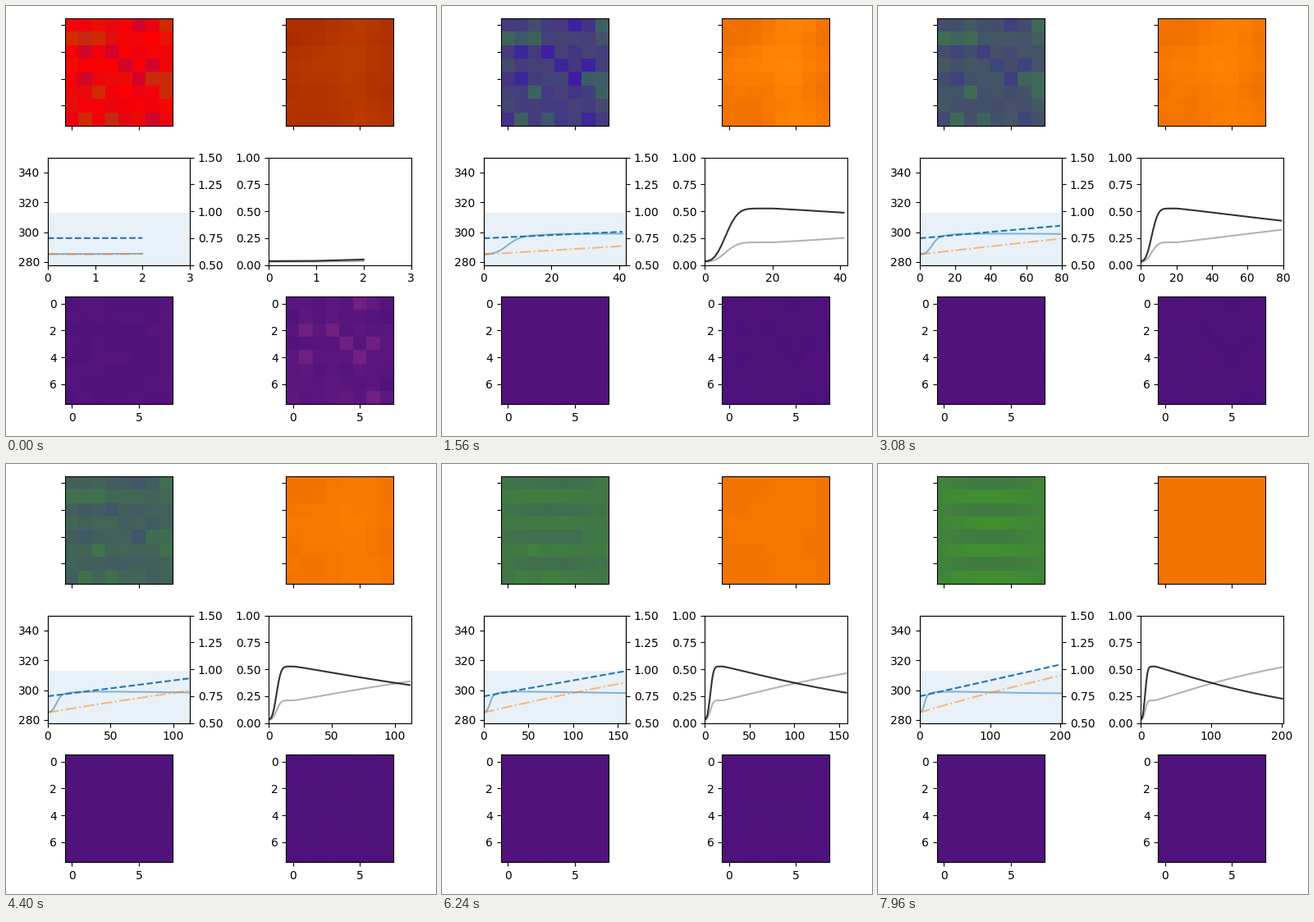
These frames come from a looping animation (524x524 px, 8 s). A matplotlib script:

```python
import numpy as np
import matplotlib.pyplot as plt
from matplotlib.animation import FuncAnimation

SIZE, DPI, N, FRAMES = 524, 100, 8, 200
t = np.arange(FRAMES + 2)
prev = np.maximum(t - 1, 0)

# ---- planet averages: quick colonisation, then white replaces black ----
rise = 1 - np.exp(-(t / 7.2) ** 2.7)
black = (.036 + .49 * rise) * np.exp(-(np.maximum(t - 20, 0) / 211) ** 1.11)
white = .066 + .67 * rise + .00005 * t - black
light = .75 + .00148 * prev


def albedo(w, b):
    return .5 + .25 * (w - b)


def warmth(lum, alb):
    return (1000 * lum * (1 - alb) / 5.67e-8) ** .25


# temperature is taken before each growth step
temp = warmth(light, albedo(white, black)[prev])
bare_temp = warmth(light, .5)

# ---- local differences around the averages ----
rng = np.random.default_rng(4)


def colony(*cells):
    """Zero-mean field with colonies at cells given as row * 10 + column."""
    f = .15 * rng.normal(size=(N, N))
    for c in cells:
        f[divmod(c, 10)] = 1
    return f - f.mean()


def column(values):
    return values[:, None, None]


white_amp = column(.15 * np.exp(-(t / 110) ** 2))
black_amp = column(.17 * np.exp(-(t / 90) ** 2) * (1 - .6 * np.exp(-t / 2.5)))
dw = white_amp * colony(7, 10, 11, 12, 46, 47, 52, 57, 71, 73)
db = black_amp * colony(5, 21, 23, 34, 36, 41, 45, 76)

row, col = np.mgrid[:N, :N]
bands = np.where(row % 2, 1, -1) * np.sin(np.pi * (col + .5) / N)
drift = column(.04 * np.clip((t - 60) / 140, 0, 1)) * bands

share = column((white + black) / .74)
W = np.clip(column(white) + dw - .8 * share * db + drift, .004, 1)
B = np.clip(column(black) + db - .8 * share * dw - drift, .004, 1)
mix = np.stack([np.clip(1 - W - B, 0, 1), W, B], axis=-1)

# heat spreads between neighbours, wrapping at the edges
spread = albedo(W, B)[prev]
for axis in (1, 2, 1, 2):
    spread = (np.roll(spread, 1, axis) + 2 * spread + np.roll(spread, -1, axis)) / 4
heat = warmth(column(light), spread)

# ---- layout, in pixels from the top left ----
LEFT, RIGHT, WIDE, TALL = 50.75, 320.25, 173.3, 130.9
TOP, MIDDLE, BOTTOM = 15, 184.7, 354.4
fig = plt.figure(figsize=(SIZE / DPI, SIZE / DPI), dpi=DPI)


def place(x, y, w):
    return fig.add_axes([x / SIZE, 1 - (y + TALL) / SIZE, w / SIZE, TALL / SIZE])


def panel(x, y, data, **style):
    ax = place(x + (WIDE - TALL) / 2, y, TALL)
    im = ax.imshow(data, aspect="auto", **style)
    ax.set_xticks([0, 5])
    ax.set_yticks([0, 2, 4, 6])
    if y == TOP:
        ax.tick_params(labelbottom=False, labelleft=False)
    return im


change = dict(cmap="magma", vmin=-.1, vmax=.3)
im_mix = panel(LEFT, TOP, mix[2])
im_heat = panel(RIGHT, TOP, heat[2], cmap="afmhot", vmin=250, vmax=350)
im_dw = panel(LEFT, BOTTOM, W[2] - W[1], **change)
im_db = panel(RIGHT, BOTTOM, B[2] - B[1], **change)

ax_temp = place(LEFT, MIDDLE, WIDE)
ax_temp.set_ylim(278, 350)
ax_temp.axhspan(278, 313, color="tab:blue", alpha=.1, lw=0)
ax_light = ax_temp.twinx()
ax_light.set_ylim(.5, 1.5)
ax_cover = place(RIGHT, MIDDLE, WIDE)
ax_cover.set_ylim(0, 1)

curves = [
    (ax_temp.plot([], [], color="tab:blue", alpha=.5)[0], temp),
    (ax_temp.plot([], [], "-.", color="tab:orange", alpha=.5)[0], bare_temp),
    (ax_light.plot([], [], "--", color="tab:blue")[0], light),
    (ax_cover.plot([], [], color="black", alpha=.3)[0], white),
    (ax_cover.plot([], [], color="black", alpha=.8)[0], black),
]


def update(k):
    now = k + 2
    im_mix.set_data(mix[now])
    im_heat.set_data(heat[now])
    im_dw.set_data(W[now] - W[now - 1])
    im_db.set_data(B[now] - B[now - 1])
    for line, values in curves:
        line.set_data(t[:now + 1], values[:now + 1])
    ax_temp.set_xlim(0, now + 1)
    ax_cover.set_xlim(0, now + 1)
    return []


anim = FuncAnimation(fig, update, frames=FRAMES, interval=40,
                     init_func=lambda: update(0), repeat=True, repeat_delay=0)
plt.show()
```
